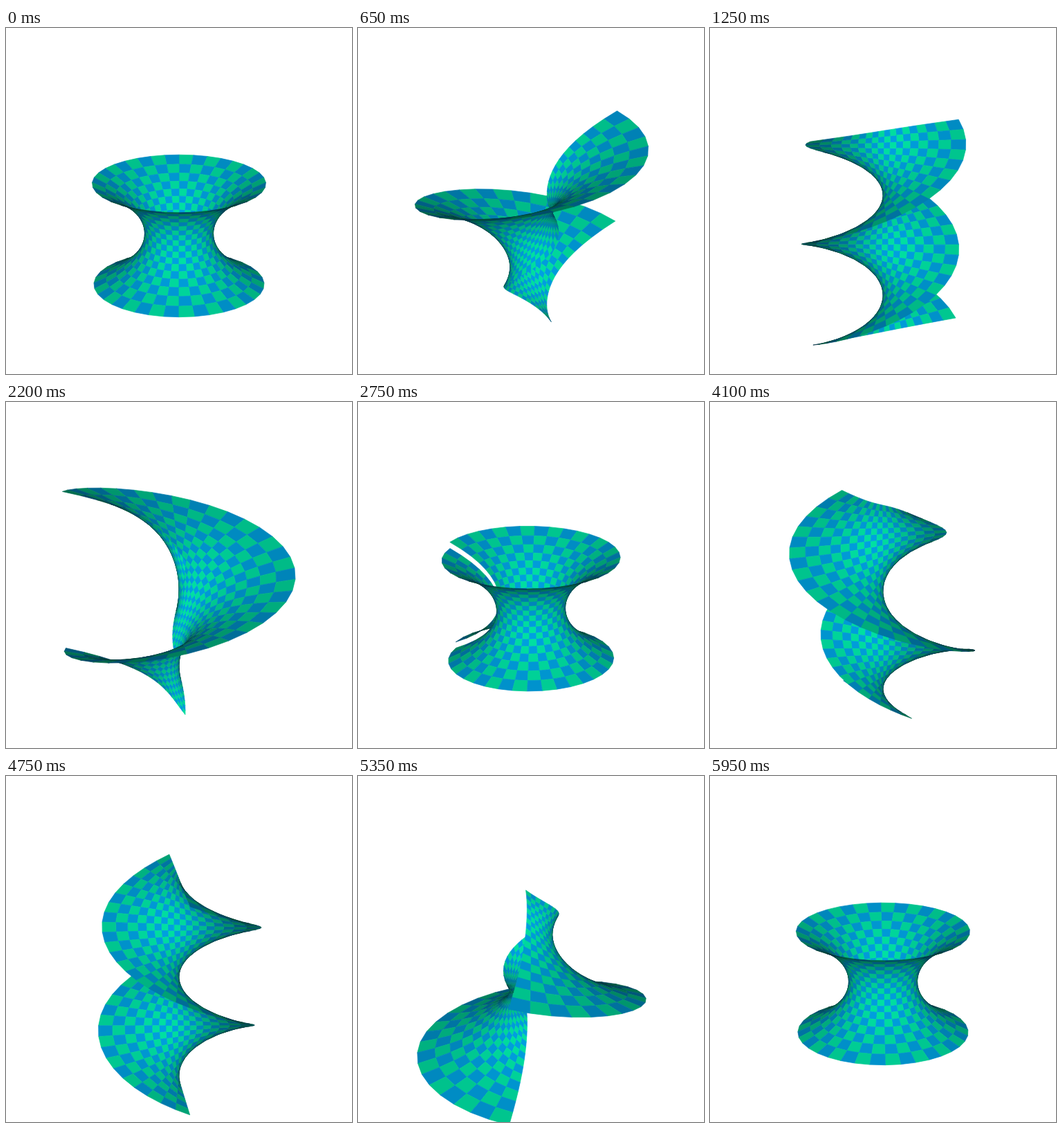
Recreate the animation shown at these times as an HTML page with a canvas. Size 500x500 px, loop 6000 ms.

```html
<!DOCTYPE html>
<html lang="en">
<head>
<meta charset="utf-8">
<title>Catenoid and helicoid</title>
<style>
  html, body { margin: 0; width: 100%; height: 100%; overflow: hidden; background: #fff; }
  canvas { display: block; width: 500px; height: 500px; }
</style>
</head>
<body>
<canvas id="stage" width="500" height="500"></canvas>
<script>
const ctx = document.getElementById('stage').getContext('2d');
const LOOP = 6000, STEP = 50, PHASE = 1500, HOLD = 150;
const COLS = 36, ROWS = 18, RAD = Math.PI / 180;
const CELL = 10 * RAD;

// Camera: looks at (0, 0, 1) from 20 degrees above the horizon.
const DIST = 54, FOCAL = 2690;
const TILT_COS = Math.cos(20 * RAD), TILT_SIN = Math.sin(20 * RAD);

const GREEN = [0, 224, 162], BLUE = [0, 160, 224];

// Each phase is a quarter turn of the blend angle, with a rest at both ends.
function blendAngle(t) {
  const phase = Math.floor(t / PHASE);
  const raw = (t - phase * PHASE - HOLD) / (PHASE - 2 * HOLD);
  const p = Math.min(1, Math.max(0, raw));
  return (phase + p * p * (3 - 2 * p)) * Math.PI / 2;
}

// Point in camera axes: right, up, toward the viewer, plus screen position.
function project(u, v, a, b, spin) {
  const r = a * Math.cosh(v) + b * Math.sinh(v);
  const z = a * v + b * u - 1;
  const x = r * Math.cos(u + spin), depth = r * Math.sin(u + spin);
  const up = z * TILT_COS + depth * TILT_SIN;
  const near = z * TILT_SIN - depth * TILT_COS;
  const scale = FOCAL / (DIST - near);
  return { x, up, near, sx: 250 + x * scale, sy: 250 - up * scale };
}

const diff = (p, q) => [p.x - q.x, p.up - q.up, p.near - q.near];

// Headlight brightness of a cell, from 0 (edge-on) to 1 (facing).
function facing(q, mid) {
  const [ax, ay, az] = diff(q[2], q[0]), [bx, by, bz] = diff(q[3], q[1]);
  const n = [ay * bz - az * by, az * bx - ax * bz, ax * by - ay * bx];
  const eye = [-mid[0], -mid[1], DIST - mid[2]];
  const dot = n[0] * eye[0] + n[1] * eye[1] + n[2] * eye[2];
  return Math.abs(dot) / (Math.hypot(...n) * Math.hypot(...eye) || 1);
}

function buildCells(t) {
  const angle = blendAngle(t), a = Math.cos(angle), b = Math.sin(angle);
  const spin = (-120 - 180 * t / LOOP) * RAD;
  const grid = [];
  for (let i = 0; i <= COLS; i++) {
    grid.push([]);
    for (let j = 0; j <= ROWS; j++) {
      grid[i].push(project(i * CELL - Math.PI, j * CELL - Math.PI / 2, a, b, spin));
    }
  }
  const cells = [];
  for (let i = 0; i < COLS; i++) {
    for (let j = 0; j < ROWS; j++) {
      const q = [grid[i][j], grid[i + 1][j], grid[i + 1][j + 1], grid[i][j + 1]];
      const mid = ['x', 'up', 'near'].map(k => q.reduce((s, p) => s + p[k], 0) / 4);
      const light = Math.max(0.3, Math.pow(facing(q, mid), 0.33));
      const base = (i + j) % 2 ? GREEN : BLUE;
      const color = `rgb(${base.map(c => Math.round(c * light)).join(',')})`;
      const far = Math.hypot(mid[0], mid[1], DIST - mid[2]);
      cells.push({ q, color, far });
    }
  }
  return cells.sort((m, n) => n.far - m.far);
}

function draw(t) {
  ctx.fillStyle = '#fff';
  ctx.fillRect(0, 0, 500, 500);
  ctx.lineWidth = 0.7;
  ctx.lineJoin = 'round';
  for (const { q, color } of buildCells(t)) {
    ctx.beginPath();
    q.forEach(p => ctx.lineTo(p.sx, p.sy));
    ctx.closePath();
    ctx.fillStyle = ctx.strokeStyle = color;
    ctx.fill();
    ctx.stroke();
  }
}

const start = performance.now();
let shown = -1;
function tick() {
  const elapsed = Math.max(0, performance.now() - start);
  const t = Math.floor(elapsed / STEP) * STEP % LOOP;
  if (t !== shown) draw(shown = t);
  requestAnimationFrame(tick);
}
tick();
</script>
</body>
</html>
```
